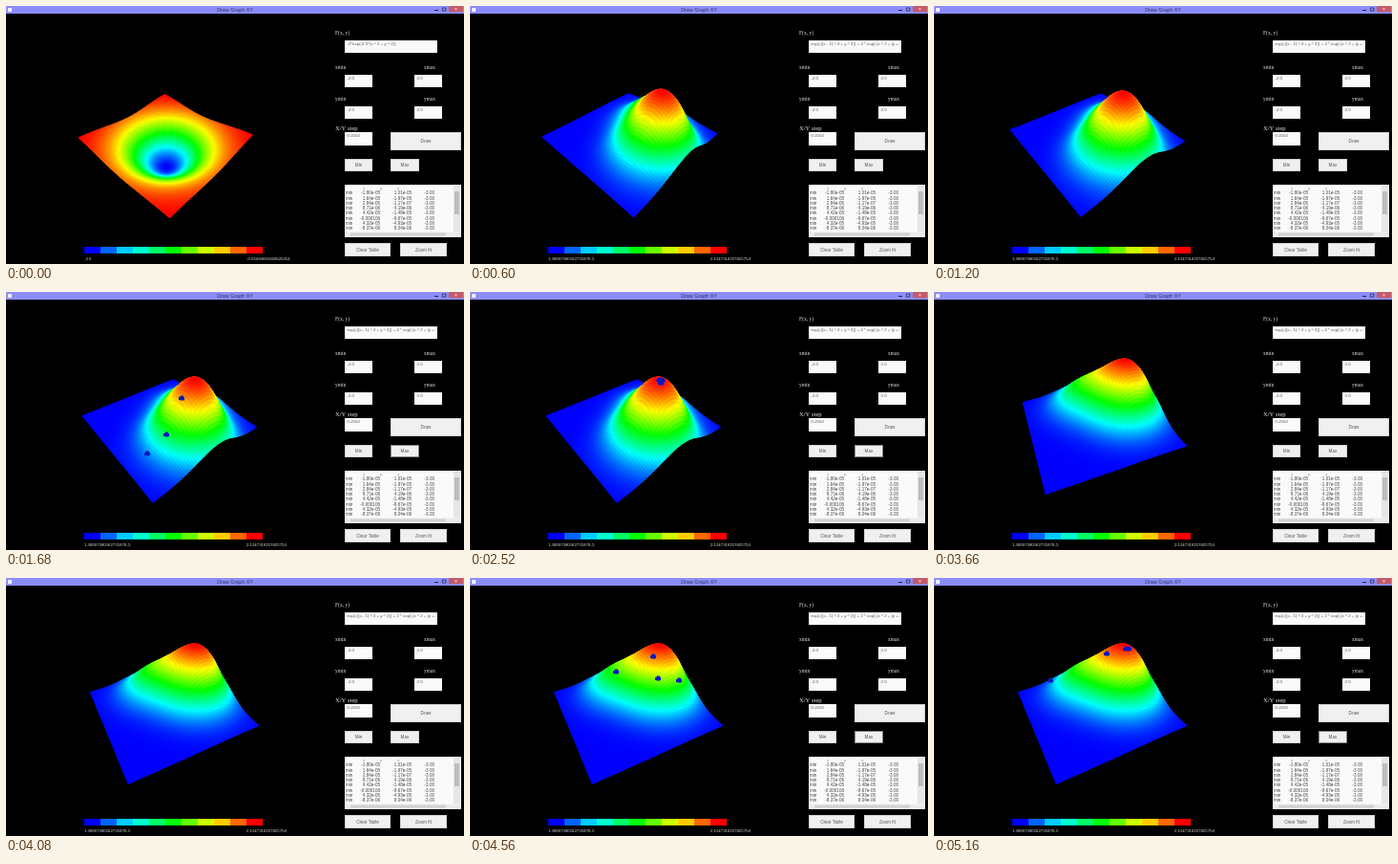
Recreate the animation shown at these times as an HTML page with a canvas. Size 480 px wide and 270 px high, loop 5.22 s.

```html
<!DOCTYPE html>
<html lang="en">
<head>
<meta charset="utf-8">
<title>Surface plot</title>
<style>
  html, body { margin: 0; width: 100%; height: 100%; overflow: hidden; background: #000; }
  canvas { display: block; width: 100vw; height: 100vh; }
</style>
</head>
<body>
<canvas id="stage" width="480" height="270"></canvas>
<script>
const LOOP = 5220, STEP = 60;
const SANS = '"Liberation Sans", Arial, sans-serif';
const SERIF = '"Liberation Serif", Times, serif';
const ctx = document.getElementById('stage').getContext('2d');

const bowl = {
  f: (x, y) => -3 * Math.exp(-0.5 * (x * x + y * y)),
  min: -3, max: -0.0549, lift: 0.68,
  formula: '-3*exp(-0.5*(x ^ 2 + y ^ 2))',
  low: '-3.0', high: '-0.05494691666620254'
};
const hill = {
  f: (x, y) => Math.exp(-((x - 1) ** 2 + y * y)) + 2 * Math.exp(-(x * x + (y + 1) ** 2)),
  min: 0, max: 2.1547, lift: 0.98,
  formula: 'exp(-((x - 1) ^ 2 + y ^ 2)) + 2 * exp(-(x ^ 2 + (y + 1) ^ 2))',
  low: '1.3890738016273597E-5', high: '2.1547316357825754'
};

const DRAW_AT = 600;
const yawKeys = [[0, 43.5], [720, 43.5], [1140, 51], [2640, 51], [3660, -22], [3780, -27.5]];

// Search markers: each path is a list of [time, x, y]
const runs = [
  { from: 1380, to: 2640, paths: [
    [[1380, 128, 183], [1680, 148, 169], [2280, 198.5, 92]],
    [[1380, 150, 166], [1680, 168, 149], [2220, 201.5, 92.5]],
    [[1380, 170, 137], [1680, 184, 111], [2100, 200, 95]]
  ] },
  { from: 4320, to: LOOP, paths: [
    [[4320, 166, 94], [4560, 153, 98], [5160, 122, 107]],
    [[4320, 197, 84], [4560, 192, 82], [5160, 181, 79]],
    [[4320, 192, 118], [4560, 197, 105], [5160, 201, 74]],
    [[4320, 228, 122], [4560, 219, 107], [5160, 204, 74]]
  ] }
];

const rows = [
  ['-1.80e-05', '1.01e-05'], ['1.64e-05', '-1.97e-05'],
  ['2.84e-05', '-1.17e-07'], ['8.71e-06', '4.19e-06'],
  ['4.42e-05', '-1.48e-05'], ['-0.000106', '-9.67e-05'],
  ['4.32e-05', '-4.93e-05'], ['-8.37e-06', '8.04e-06']
];

// Linear interpolation over [time, ...values] keys
function at(keys, t) {
  let i = 0;
  while (i < keys.length - 2 && t > keys[i + 1][0]) i++;
  const a = keys[i], b = keys[i + 1];
  const p = Math.min(1, Math.max(0, (t - a[0]) / (b[0] - a[0])));
  return a.slice(1).map((v, n) => v + (b[n + 1] - v) * p);
}

function rect(x, y, w, h, color) {
  ctx.fillStyle = color;
  ctx.fillRect(x, y, w, h);
}

function text(str, x, y, size, color, font = SANS, align = 'left') {
  ctx.font = size + 'px ' + font;
  ctx.fillStyle = color;
  ctx.textAlign = align;
  ctx.textBaseline = 'middle';
  ctx.fillText(str, x, y);
}

const heat = p => `hsl(${(240 * (1 - Math.min(1, Math.max(0, p)))).toFixed(1)},100%,50%)`;

// Perspective view pitched 45 degrees, slightly stretched sideways
const TILT = Math.SQRT1_2, DIST = 6.15, FOCAL_X = 199, FOCAL_Y = 178;
const CX = 168, CY = 135.5, N = 64;

const layer = document.createElement('canvas');
layer.width = 480;
layer.height = 270;
const pen = layer.getContext('2d');
let layerKey = '';

function drawSurface(plot, yaw) {
  const key = plot.low + yaw;
  if (key === layerKey) return;
  layerKey = key;
  pen.clearRect(0, 0, 480, 270);
  const a = yaw * Math.PI / 180, ca = Math.cos(a), sa = Math.sin(a);
  const grid = [];
  for (let i = 0; i <= N; i++) {
    for (let j = 0; j <= N; j++) {
      const x = 4 * i / N - 2, y = 4 * j / N - 2, z = plot.f(x, y);
      const u = x * sa - y * ca, v = -x * ca - y * sa, h = z * plot.lift;
      const depth = DIST - (v + h) * TILT;
      grid.push({ x: CX + FOCAL_X * u / depth, y: CY + FOCAL_Y * (v - h) * TILT / depth, z, v });
    }
  }
  const cells = [];
  for (let i = 0; i < N; i++) {
    for (let j = 0; j < N; j++) {
      const n = i * (N + 1) + j;
      cells.push([grid[n], grid[n + 1], grid[n + N + 2], grid[n + N + 1]]);
    }
  }
  cells.sort((p, q) => p[0].v + p[2].v - q[0].v - q[2].v);
  pen.lineWidth = 1;
  pen.lineJoin = 'round';
  for (const c of cells) {
    const mean = (c[0].z + c[1].z + c[2].z + c[3].z) / 4;
    pen.fillStyle = pen.strokeStyle = heat((mean - plot.min) / (plot.max - plot.min));
    pen.beginPath();
    c.forEach(p => pen.lineTo(p.x, p.y));
    pen.closePath();
    pen.fill();
    pen.stroke();
  }
}

function drawMarkers(t) {
  for (const run of runs) {
    if (t < run.from || t >= run.to) continue;
    for (const path of run.paths) {
      const [x, y] = at(path, t);
      rect(x - 3, y - 1, 6, 3, '#0a18c4');
      rect(x - 1.5, y - 2.5, 3.5, 5, '#0a18c4');
    }
  }
}

function drawScale(plot) {
  for (let i = 0; i < 11; i++) rect(82 + 17 * i, 252, 17, 7, heat(i / 10));
  text(plot.low, 82, 264.5, 4.3, '#ddd');
  text(plot.high, 252, 264.5, 4.3, '#ddd');
}

function field(x, y, w, h, str) {
  rect(x, y, w, h, '#fafafa');
  ctx.save();
  ctx.beginPath();
  ctx.rect(x, y, w - 1, h);
  ctx.clip();
  text(str, x + 2.5, y + 3.8, 4.4, '#555');
  ctx.restore();
}

function button(x, y, w, h, str, focus) {
  rect(x, y, w, h, '#f0f0f0');
  ctx.lineWidth = 1;
  ctx.strokeStyle = focus ? '#888' : '#d4d4d4';
  ctx.strokeRect(x + 0.5, y + 0.5, w - 1, h - 1);
  text(str, x + w / 2, y + h / 2 + 0.3, 4.7, '#555', SANS, 'center');
}

function drawTable() {
  rect(355, 187, 122, 55, '#fafafa');
  ['x', 'y', 'z'].forEach((s, i) => text(s, 374 + 18 * i, 190.5, 4, '#777'));
  rows.forEach(([x, y], i) => {
    const top = 196 + 5.3 * i;
    text('min', 356, top, 4.6, '#444');
    text(x, 392, top, 4.6, '#444', SANS, 'right');
    text(y, 425, top, 4.6, '#444', SANS, 'right');
    text('-3.00', 449, top, 4.6, '#444', SANS, 'right');
  });
  rect(469, 188, 7, 48, '#e6e6e6');
  rect(470, 194, 5, 24, '#bdbdbd');
  rect(356, 236.5, 120, 5, '#ececec');
  rect(361, 237.5, 100, 3, '#d2d2d2');
}

function drawTitle() {
  rect(0, 0, 480, 8, '#8c8cfa');
  rect(2, 2, 4, 4, '#f0f0f8');
  text('Draw Graph XY', 240, 4.2, 5.4, '#33335e', SANS, 'center');
  rect(449, 4, 4, 1, '#22224a');
  ctx.lineWidth = 0.7;
  ctx.strokeStyle = '#22224a';
  ctx.strokeRect(457.5, 2, 3.5, 3);
  rect(464, 0, 15, 6, '#c65a68');
  text('×', 471.5, 3.2, 6, '#fff', SANS, 'center');
}

function drawPanel(plot, t) {
  const label = (s, x, y, size = 6.2) => text(s, x, y, size, '#e4e4e4', SERIF);
  label('F(x, y)', 345, 28.5, 5.6);
  field(355, 36, 97, 13, plot.formula);
  label('xmin', 345, 65, 5.4);
  label('xmax', 438, 65, 5.4);
  field(355, 72, 29, 13, '-2.0');
  field(428, 72, 29, 13, '2.0');
  label('ymin', 345, 97.5, 5.4);
  label('ymax', 438, 97.5, 5.4);
  field(355, 105, 29, 13, '-2.0');
  field(428, 105, 29, 13, '2.0');
  label('X/Y step', 345, 128, 6.6);
  field(355, 132, 29, 14, '0.2502');
  button(403, 132, 74, 19, 'Draw');
  button(355, 160, 29, 13, 'Min');
  button(403, 160, 30, 13, 'Max', runs.some(r => t >= r.from && t < r.to));
  drawTable();
  button(355, 248, 48, 14, 'Clear Table');
  button(413, 248, 49, 14, 'Zoom fit');
}

function render(t) {
  const plot = t < DRAW_AT ? bowl : hill;
  rect(0, 0, 480, 270, '#000');
  drawSurface(plot, at(yawKeys, t)[0]);
  ctx.drawImage(layer, 0, 0);
  drawMarkers(t);
  drawScale(plot);
  drawPanel(plot, t);
  drawTitle();
}

const start = performance.now();
let shown = -1;
function tick() {
  const elapsed = (performance.now() - start) % LOOP;
  const t = Math.floor(elapsed / STEP) * STEP;
  if (t !== shown) {
    shown = t;
    render(t);
  }
  requestAnimationFrame(tick);
}
tick();
</script>
</body>
</html>
```
